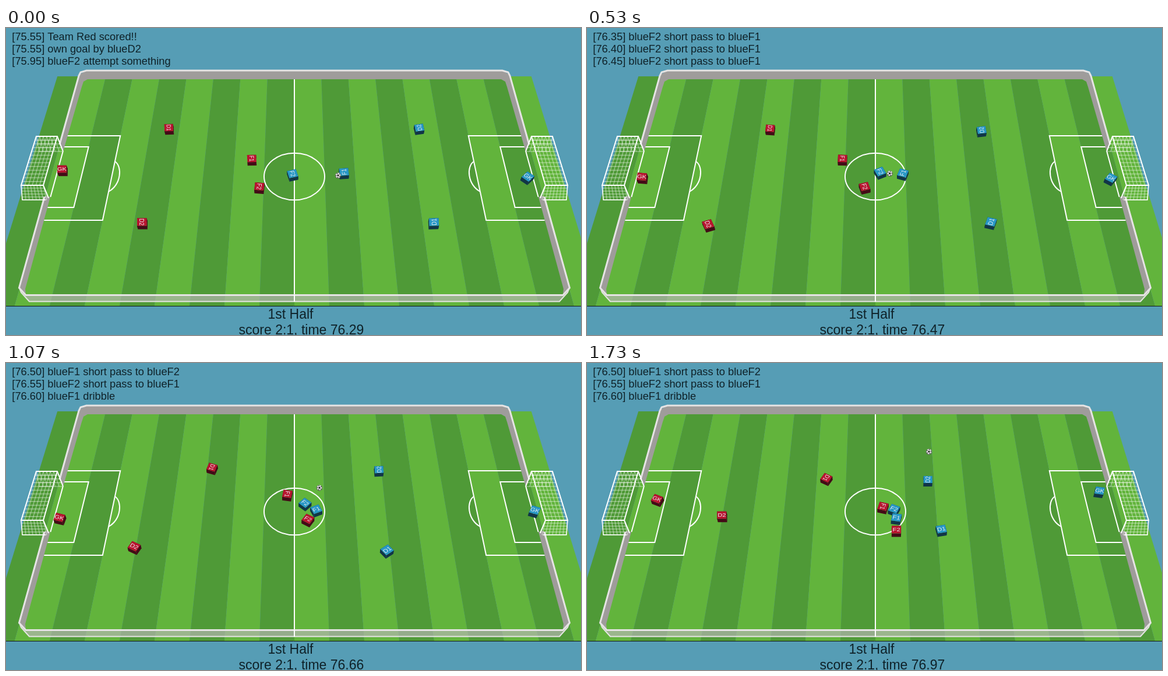
Write an HTML page with a canvas that moves like this. It is 987 px wide and 527 px high and loops after 1860 ms.

```html
<!DOCTYPE html>
<html lang="en">
<head>
<meta charset="utf-8">
<title>Cube soccer</title>
<style>
html, body { margin: 0; width: 100%; height: 100%; overflow: hidden; background: #569db5; }
canvas { display: block; }
</style>
</head>
<body>
<canvas id="stage" width="987" height="527"></canvas>
<script>
const ctx = document.getElementById('stage').getContext('2d');
const FONT = '"Liberation Sans", Arial, sans-serif';
const SKY = '#569db5', LIGHT = '#62b43c', DARK = '#4f9a37', WALL = '#9f9c9b', RIM = '#e6e4e4';
const MID = 495, GOAL_LINE = -7.83, LOOP = 1860, LAST_STEP = 13;

// Width of one mowing stripe on screen row y; gives the perspective of the ground.
const stripeWidth = y => 46.4 + (y - 88) * 0.035;
const ground = (k, y) => [MID + k * stripeWidth(y), y];
const mix = (a, b, u) => a + (b - a) * u;
const mixPoint = (p, q, u) => [mix(p[0], q[0], u), mix(p[1], q[1], u)];
const smooth = u => u * u * (3 - 2 * u);

function trace(points, closed) {
  ctx.beginPath();
  points.forEach(p => ctx.lineTo(p[0], p[1]));
  if (closed) ctx.closePath();
}
function fill(points, color) {
  trace(points, true);
  ctx.fillStyle = color;
  ctx.fill();
}
function stroke(points, width = 2, color = '#fff') {
  trace(points);
  ctx.lineWidth = width;
  ctx.strokeStyle = color;
  ctx.stroke();
}
function disc(x, y, r, color) {
  ctx.beginPath();
  ctx.arc(x, y, r, 0, 7);
  ctx.fillStyle = color;
  ctx.fill();
}
function bothSides(draw) {
  draw();
  ctx.save();
  ctx.translate(2 * MID, 0);
  ctx.scale(-1, 1);
  draw();
  ctx.restore();
}

function drawGround() {
  ctx.fillStyle = SKY;
  ctx.fillRect(0, 0, 987, 527);
  for (let k = -9; k < 9; k++) {
    const left = Math.max(k, -8.8), right = Math.min(k + 1, 8.8);
    fill([ground(left, 83), ground(right, 83), ground(right, 477), ground(left, 477)],
      k % 2 ? DARK : LIGHT);
  }
}

function drawMarkings() {
  stroke([[MID, 87], [MID, 470]]);
  ctx.beginPath();
  ctx.ellipse(MID, 255, 52, 40.3, 0, 0, 7);
  ctx.stroke();
  const box = (k, top, bottom) =>
    stroke([ground(GOAL_LINE, top), ground(k, top), ground(k, bottom), ground(GOAL_LINE, bottom)]);
  bothSides(() => {
    box(-6, 185, 330);
    box(-7, 204, 308);
    stroke([ground(GOAL_LINE, 212), ground(GOAL_LINE, 290)]);
    ctx.beginPath();
    ctx.moveTo(...ground(-6, 229));
    ctx.bezierCurveTo(200, 238, 198, 268, ...ground(-6, 281));
    ctx.stroke();
  });
}

function drawWalls() {
  bothSides(() => {
    fill([[MID, 73], [138, 73], [126, 80], [92, 200], [98, 212], [130, 101], [133, 92], [140, 88], [MID, 88]], WALL);
    fill([[67, 288], [76, 290], [33, 448], [34, 458], [22, 446]], WALL);
    fill([[22, 447], [34, 458], [MID, 458], [MID, 470], [40, 470]], 'rgba(190,185,190,.62)');
    stroke([[92, 200], [125, 82], [128, 76], [138, 73], [MID, 73]], 3, RIM);
    stroke([[66, 290], [22.5, 446], [34, 458.5], [MID, 458.5]], 3, RIM);
    stroke([[23, 446], [26, 454], [40, 469.5], [MID, 469.5]], 2, RIM);
  });
  stroke([[MID, 458], [MID, 470]]);
}

function net(a, b, c, d, across, along) {
  const thread = 'rgba(255,255,255,.55)';
  for (let i = 0; i <= across; i++)
    stroke([mixPoint(a, b, i / across), mixPoint(d, c, i / across)], 1, thread);
  for (let i = 0; i <= along; i++)
    stroke([mixPoint(a, d, i / along), mixPoint(b, c, i / along)], 1, thread);
}

function drawGoals() {
  const farBack = [52, 186], farFront = [88, 186], nearFront = [64, 270], nearBack = [26, 270];
  const farBackFoot = [57, 212], farFrontFoot = [98, 212], nearFrontFoot = [73, 292], nearBackFoot = [28, 295];
  bothSides(() => {
    net(farBack, farFront, farFrontFoot, farBackFoot, 6, 4);
    net(farBack, farFront, nearFront, nearBack, 6, 13);
    net(nearBack, nearFront, [70, 295], nearBackFoot, 7, 5);
    stroke([farFrontFoot, farFront, farBack, nearBack, nearFront, nearFrontFoot]);
    stroke([farFront, nearFront]);
    stroke([nearBack, nearBackFoot, [68, 295]], 1.5);
  });
}

// Smooth curve through a few values that are evenly spread over u = 0..1.
function spline(values, u) {
  const spans = values.length - 1;
  const i = Math.min(Math.floor(u * spans), spans - 1), t = u * spans - i;
  const b = values[i], c = values[i + 1];
  const a = values[i - 1] ?? 2 * b - c, d = values[i + 2] ?? 2 * c - b;
  return b + t / 2 * (c - a + t * (2 * a - 5 * b + 4 * c - d + t * (3 * (b - c) + d - a)));
}
const along = (path, u) => [0, 1].map(axis => spline(path.map(p => p[axis]), u));

const RED = { top: '#b8142f', side: '#430b17' };
const BLUE = { top: '#2797c6', side: '#113547' };
const player = (team, label, from, to, ...path) => ({ team, label, from, to, path });

// Team, label, first and last heading in degrees, then a few points on the way.
const PLAYERS = [
  player(RED, 'GK', 0, 25, [97, 245], [95, 259], [94, 267], [121, 236]),
  player(RED, 'D1', 88, 120, [280, 174], [338, 178], [411, 200]),
  player(RED, 'D2', 90, 0, [234, 336], [208, 339], [223, 312], [232, 264]),
  player(RED, 'F1', 88, 105, [422, 227], [441, 227], [489, 229], [508, 249]),
  player(RED, 'F2', 95, 0, [435, 275], [480, 275], [523, 271], [531, 289]),
  player(BLUE, 'GK', 40, 10, [895, 258], [899, 260], [906, 253], [879, 222]),
  player(BLUE, 'D1', -92, -12, [734, 336], [668, 331], [608, 288]),
  player(BLUE, 'D2', -100, -90, [709, 174], [655, 182], [585, 203]),
  player(BLUE, 'F1', -95, 10, [580, 250], [540, 252], [532, 255], [531, 268]),
  player(BLUE, 'F2', 75, 25, [492, 253], [504, 249], [515, 243], [527, 253]),
];
const BALL_PATH = [[570, 253], [523, 253], [526, 230], [556, 193], [587, 152]];

function drawPlayer({ team, label, x, y, turn }) {
  const half = 7.8 * stripeWidth(y) / 52, squash = 0.8, height = 6;
  const angle = turn * Math.PI / 180, lean = (MID - x) * 0.0055;
  const cx = x - lean / 2, cy = y - height / 2;
  const top = [[-1, -1], [1, -1], [1, 1], [-1, 1]].map(([u, v]) => [
    cx + half * (u * Math.cos(angle) - v * Math.sin(angle)),
    cy + half * squash * (u * Math.sin(angle) + v * Math.cos(angle)),
  ]);
  const base = top.map(p => [p[0] + lean, p[1] + height]);
  top.forEach((p, i) => {
    const j = (i + 1) % 4;
    fill([p, top[j], base[j], base[i]], team.side);
  });
  fill(top, team.top);
  ctx.save();
  ctx.translate(cx, cy);
  ctx.scale(1, squash);
  ctx.rotate(angle);
  ctx.font = `${half * 1.42}px ${FONT}`;
  ctx.textAlign = 'center';
  ctx.fillStyle = '#ececf0';
  ctx.fillText(label, 0, half * 0.5);
  ctx.restore();
}

function drawBall({ x, y }) {
  disc(x, y + 0.5, 5, '#4a5546');
  disc(x, y, 4.5, '#dededc');
  disc(x, y, 1.6, '#1c1c1c');
  for (let i = 0; i < 5; i++) {
    const a = x / 9 + i * Math.PI * 0.4;
    disc(x + 3.6 * Math.cos(a), y + 3.6 * Math.sin(a), 0.9, '#3a3a3a');
  }
}

// Hundredths of a second after 76.00 shown by the match clock at each step.
const CLOCK = [29, 34, 39, 43, 47, 52, 56, 61, 66, 71, 76, 83, 90, 97];
const pass = (time, from, to) => [time, `blue${from} short pass to blue${to}`];
const EVENTS = [
  [75.55, 'Team Red scored!!'],
  [75.55, 'own goal by blueD2'],
  [75.95, 'blueF2 attempt something'],
  pass(76.35, 'F2', 'F1'),
  pass(76.40, 'F2', 'F1'),
  pass(76.45, 'F2', 'F1'),
  pass(76.50, 'F1', 'F2'),
  pass(76.55, 'F2', 'F1'),
  [76.60, 'blueF1 dribble'],
];

function write(text, x, y, size) {
  ctx.font = `${size}px ${FONT}`;
  ctx.textAlign = 'left';
  ctx.fillStyle = '#0f2229';
  ctx.fillText(text, x, y);
}

function drawTexts(clock) {
  EVENTS.filter(([time]) => time <= clock).slice(-3).forEach(([time, text], row) =>
    write(`[${time.toFixed(2)}] ${text}`, 10.3, 20.5 + row * 21.3, 18.3));
  ctx.fillStyle = SKY;
  ctx.fillRect(0, 477, 987, 50);
  stroke([[0, 477.5], [987, 477.5]], 1, '#101818');
  write('1st Half', 449.5, 499, 23);
  write(`score 2:1, time ${clock.toFixed(2)}`, 399.5, 526, 23);
}

function draw(step) {
  const u = step / LAST_STEP;
  drawGround();
  drawMarkings();
  drawWalls();
  drawGoals();
  const place = path => {
    const [x, y] = along(path, u);
    return { x, y };
  };
  const pieces = PLAYERS.map(p => ({ ...p, ...place(p.path), turn: mix(p.from, p.to, smooth(u)) }));
  pieces.push(place(BALL_PATH));
  pieces.sort((a, b) => a.y - b.y).forEach(p => p.label ? drawPlayer(p) : drawBall(p));
  drawTexts(76 + CLOCK[step] / 100);
}

// The picture is refreshed 7.5 times a second, on a grid of 10 ms.
const stepStart = step => Math.round(step * 40 / 3) * 10;
let shown = -1;
function frame(now) {
  const t = now % LOOP;
  let step = LAST_STEP;
  while (stepStart(step) > t) step--;
  if (step !== shown) draw(shown = step);
  requestAnimationFrame(frame);
}
frame(0);
</script>
</body>
</html>
```
